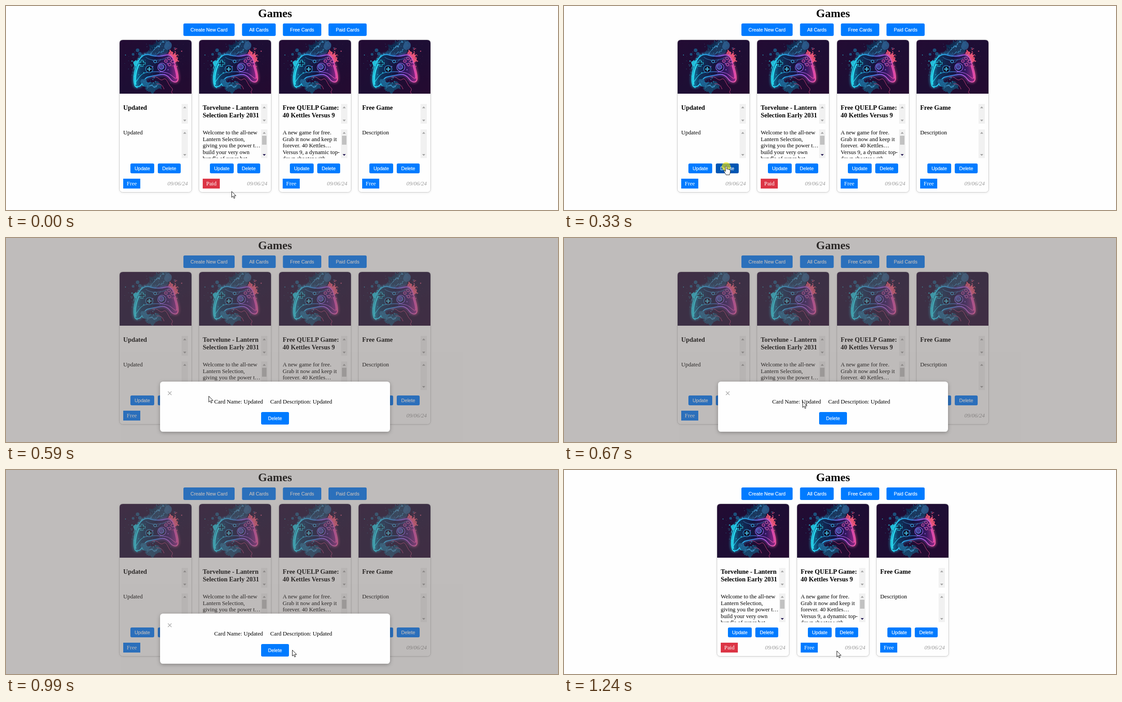
These frames come from a looping animation (1229 by 456 pixels, 1.83 s). An HTML page:

```html
<!DOCTYPE html>
<html lang="en">
<head>
<meta charset="utf-8">
<title>Games</title>
<style>
html, body { margin: 0; width: 100%; height: 100%; overflow: hidden; background: #fefefe; }
svg { display: block; }
text { font-family: "Liberation Serif", "Times New Roman", serif; font-size: 12.8px; white-space: pre; }
.h1 { font-size: 25.6px; font-weight: bold; text-anchor: middle; }
.name { font-size: 14.4px; font-weight: bold; }
.date { font-style: italic; fill: #999; text-anchor: end; }
.btn rect { fill: #007bff; }
.btn text { font-family: "Liberation Sans", Arial, sans-serif; font-size: 10.667px; fill: #fff; stroke: #fff; stroke-width: .2; text-anchor: middle; }
.tag text { fill: #fff; text-anchor: middle; }
.card > .box { fill: #fefefe; stroke: #ccc; filter: drop-shadow(0 1px 2px rgba(0,0,0,.08)); }
.modal > .box { fill: #fefefe; filter: drop-shadow(0 2px 4px rgba(0,0,0,.3)); }

.row, .gone, .dialog, .hot1 rect, .hot2 rect, .cursor, .arrow, .hand, .ring {
  animation: 1830ms step-end infinite;
}
.row { animation-name: row; }
.gone { animation-name: gone; }
.dialog { animation-name: dialog; }
.hot1 rect { animation-name: hot1; }
.hot2 rect { animation-name: hot2; }
.cursor { animation-name: move; }
.arrow { animation-name: arrow; }
.hand { animation-name: hand; }
.ring { animation-name: ring; }

@keyframes row { 0% { transform: none; } 67.75%, 100% { transform: translateX(-89px); } }
@keyframes gone { 0% { visibility: visible; } 67.75%, 100% { visibility: hidden; } }
@keyframes dialog { 0% { visibility: hidden; } 22.95% { visibility: visible; } 67.75%, 100% { visibility: hidden; } }
@keyframes hot1 { 0% { fill: #007bff; } 13.66% { fill: #0056b3; } 22.95%, 100% { fill: #007bff; } }
@keyframes hot2 { 0% { fill: #007bff; } 54.64% { fill: #0056b3; } 67.75%, 100% { fill: #007bff; } }
@keyframes arrow {
  0% { visibility: visible; } 13.66% { visibility: hidden; }
  22.95% { visibility: visible; } 54.64% { visibility: hidden; }
  67.75%, 100% { visibility: visible; }
}
@keyframes hand {
  0% { visibility: hidden; } 13.66% { visibility: visible; }
  22.95% { visibility: hidden; } 54.64% { visibility: visible; }
  67.75%, 100% { visibility: hidden; }
}
@keyframes ring {
  0% { visibility: hidden; } 18.03% { visibility: visible; }
  22.95% { visibility: hidden; } 63.38% { visibility: visible; }
  67.75%, 100% { visibility: hidden; }
}
@keyframes move {
  0% { transform: translate(502px, 414px); }
  4.37% { transform: translate(486px, 408px); }
  8.74% { transform: translate(427px, 384px); }
  13.66% { transform: translate(371px, 361px); }
  18.03% { transform: translate(361px, 358px); }
  22.95% { transform: translate(361px, 358px); }
  27.32% { transform: translate(388px, 355px); }
  32.24% { transform: translate(451px, 353px); }
  36.61% { transform: translate(531px, 365px); }
  40.98% { transform: translate(606px, 386px); }
  45.35% { transform: translate(642px, 399px); }
  49.72% { transform: translate(637px, 402px); }
  54.64% { transform: translate(618px, 403px); }
  59.01% { transform: translate(608px, 403px); }
  63.38% { transform: translate(607px, 403px); }
  67.75%, 100% { transform: translate(607px, 404px); }
}
</style>
</head>
<body>
<svg id="stage" width="1229" height="456" viewBox="0 0 1229 456">
  <defs>
    <clipPath id="photo"><path d="M0 120V7Q0 0 7 0H153Q160 0 160 7V120Z"/></clipPath>
    <clipPath id="scroll"><rect x="8" y="200" width="131" height="64"/></clipPath>
    <linearGradient id="night" x2="1" y2="1">
      <stop stop-color="#230b33"/><stop offset=".5" stop-color="#1d0e34"/><stop offset="1" stop-color="#250a30"/>
    </linearGradient>
    <linearGradient id="shell" x2="1">
      <stop stop-color="#128db5"/><stop offset=".16" stop-color="#0e3760"/><stop offset=".5" stop-color="#15133d"/>
      <stop offset=".8" stop-color="#361863"/><stop offset="1" stop-color="#a02c8c"/>
    </linearGradient>
    <linearGradient id="neon" x2="1">
      <stop stop-color="#25e0f6"/><stop offset=".45" stop-color="#2f8ae0"/>
      <stop offset=".7" stop-color="#9a58e8"/><stop offset="1" stop-color="#ff5ba6"/>
    </linearGradient>
    <filter id="rough" x="-.1" y="-.1" width="1.2" height="1.2">
      <feTurbulence type="fractalNoise" baseFrequency=".12" numOctaves="3" seed="4"/>
      <feDisplacementMap in="SourceGraphic" scale="14" xChannelSelector="R" yChannelSelector="G"/>
    </filter>
    <filter id="glow"><feGaussianBlur stdDeviation="2.5"/></filter>
    <path id="pad" d="M34 102C29 88 33 62 44 44C50 34 58 31 66 33C76 37 92 37 102 34C112 31 119 38 122 50C127 64 131 78 130 88C128 97 118 95 112 86C106 78 100 76 92 77C80 79 70 81 62 83C52 87 50 104 42 104C38 105 35 104 34 102Z"/>
    <g id="art">
      <rect width="160" height="120" fill="url(#night)"/>
      <g fill="#174268" filter="url(#rough)">
        <path d="M62 36C58 24 70 22 74 14C77 7 82 10 85 0H110C112 8 103 10 108 18C113 26 104 36 92 34Z" opacity=".8"/>
        <path d="M54 101C60 90 66 99 74 94C84 90 92 97 96 107C90 114 84 108 79 117C70 123 66 110 58 112Z"/>
        <path d="M66 13C72 4 77 13 83 6C87 17 78 24 70 24Z" fill="#102c50"/>
        <path d="M68 30C76 25 74 18 83 16S88 7 97 4M84 31C91 27 96 29 100 20M61 106C70 100 76 108 86 101" fill="none" stroke="#3986b8" stroke-width="2"/>
        <path d="M108 35L113 25L119 29L126 24L125 32L132 37L126 42L130 50L120 52Z" fill="#e7526f"/>
        <path d="M27 45L35 48L42 40L52 32L47 48L38 60L28 66L34 56Z" fill="#20b8d3"/>
        <path d="M31 82L38 90L36 108L44 98L56 103L50 88Z" fill="#23b7d4"/>
      </g>
      <path d="M103 4C112 0 119 8 115 17C111 25 99 23 99 14Z" fill="#2e6294" opacity=".8"/>
      <g fill="#1c4f7b"><circle cx="40" cy="23" r="4"/><circle cx="30" cy="32" r="3"/><circle cx="45" cy="31" r="4"/></g>
      <use href="#pad" fill="none" stroke="url(#neon)" stroke-width="6" opacity=".5" filter="url(#glow)"/>
      <use href="#pad" fill="url(#shell)" stroke="url(#neon)" stroke-width="2"/>
      <path d="M36 100C33 84 37 64 46 49" fill="none" stroke="#2fe3f5" stroke-width="2.6"/>
      <path d="M121 56C125 68 128 78 127 86" fill="none" stroke="#ee4fb4" stroke-width="2.4"/>
      <path d="M36 94C42 86 46 76 58 73C72 70 94 70 107 74C118 78 121 88 128 85" fill="none" stroke="url(#neon)" stroke-width="1.1"/>
      <path d="M58 38C68 48 94 47 108 38M72 44C76 52 88 53 91 43" fill="none" stroke="#367ebd"/>
      <path d="M72 84C83 76 89 94 97 88S107 99 115 106S110 116 118 119M82 98C91 97 96 101 99 110" fill="none" stroke="#c7437e"/>
      <path d="M45 90C50 83 56 93 63 86V97C69 90 66 106 58 104" fill="#1a6291" filter="url(#rough)"/>
      <path d="M48 45H52V50H57V54H52V59H48V54H43V50H48Z" fill="#0b1d3d" stroke="#2fd2ec" stroke-width="1.1"/>
      <g fill="#110f30" stroke-width="1.4">
        <circle cx="66" cy="65" r="8" stroke="#2a8bc4"/>
        <circle cx="94" cy="61" r="9" stroke="#8c62e6"/>
        <circle cx="93" cy="60" r="5.5" fill="#463c91" stroke="#587ee4"/>
        <circle cx="79" cy="48" r="3" stroke="#3b9ad3"/>
      </g>
      <path d="M66 60V70M61 65H71" stroke="#43bddc" stroke-width="2.2"/>
      <g fill="#4a1c6c" stroke="#f36cbb">
        <circle cx="110" cy="41" r="3.2"/><circle cx="118" cy="48" r="3.2"/>
        <circle cx="103" cy="47" r="3.2"/><circle cx="111" cy="55" r="3.2"/>
      </g>
      <g id="spray"></g>
    </g>
  </defs>
</svg>
<script>
const stage = document.getElementById('stage');

const label = (x, y, s, cls = '') => `<text class="${cls}" x="${x}" y="${Math.round(y)}">${s}</text>`;
const lines = (list, y, step, cls) => list.map((s, i) => label(8, y + i * step, s, cls)).join('');
const button = (x, y, w, h, s, cls = '') =>
  `<g class="btn ${cls}"><rect x="${x}" y="${y}" width="${w}" height="${h}" rx="3.2"/>` +
  label(x + w / 2, y + h / 2 + 4, s) + '</g>';

function scrollbar(y, h, thumb) {
  const x = 138, mid = x + 7, low = y + h - 9;
  return `<rect x="${x}" y="${y}" width="14" height="${h}" fill="#f1f1f1"/>` +
    `<path d="M${mid - 3.5} ${y + 9.5}l3.5 -4l3.5 4z" fill="#a3a3a3"/>` +
    `<path d="M${mid - 3.5} ${low}l3.5 4l3.5 -4z" fill="${thumb ? '#2b2058' : '#a3a3a3'}"/>` +
    (thumb ? `<rect x="${x + 2}" y="${y + 14}" width="10" height="20" fill="#c1c1c1"/>` : '');
}

function card({ x, name, text, paid, cls = '', hot = '' }) {
  return `<g class="${cls}"><g class="card" transform="translate(${x} 76)">
    <rect class="box" x="-.5" y="-.5" width="161" height="341" rx="7"/>
    <use href="#art" clip-path="url(#photo)"/>
    ${lines(name, 156, 16.6, 'name')}${scrollbar(143, 44)}
    <g clip-path="url(#scroll)">${lines(text, 211.3, 14.54)}</g>${scrollbar(200, 64, text.length > 1)}
    ${button(24, 276, 53, 22, 'Update')}${button(85, 276, 51, 22, 'Delete', hot)}
    <g class="tag"><rect x="8" y="310" width="38" height="22" fill="${paid ? '#dc3545' : '#007bff'}"/>
    ${label(27.2, 325, paid ? 'Paid' : 'Free')}</g>${label(152, 325, '09/06/24', 'date')}
  </g></g>`;
}

const cards = [
  { x: 253, name: ['Updated'], text: ['Updated'], cls: 'gone', hot: 'hot1' },
  { x: 430, name: ['Torvelune - Lantern', 'Selection Early 2031'], paid: true,
    text: ['Welcome to the all-new', 'Lantern Selection,', 'giving you the power t…', 'build your very own', 'bundle of super hot'] },
  { x: 608, name: ['Free QUELP Game:', '40 Kettles Versus 9'],
    text: ['A new game for free.', 'Grab it now and keep it', 'forever. 40 Kettles…', 'Versus 9, a dynamic top-', 'down shooter with'] },
  { x: 785, name: ['Free Game'], text: ['Description'] }
];

stage.insertAdjacentHTML('beforeend', `
  <rect width="1229" height="456" fill="#fefefe"/>
  ${label(599, 25, 'Games', 'h1')}
  ${button(395, 39, 114, 28, 'Create New Card')}${button(525.5, 39, 75, 28, 'All Cards')}
  ${button(616.5, 39, 85.5, 28, 'Free Cards')}${button(718, 39, 85, 28, 'Paid Cards')}
  <g class="row">${cards.map(card).join('')}</g>
  <g class="dialog">
    <rect width="1229" height="456" fill="rgba(104,95,93,.42)"/>
    <g class="modal">
      <rect class="box" x="343" y="321" width="512" height="112" rx="6.4"/>
      <path d="M360.5 343l8 8m0 -8l-8 8" stroke="#aaa" stroke-width="1.4"/>
      ${label(463.5, 370, 'Card Name: Updated')}${label(588.3, 370, 'Card Description: Updated')}
      ${button(568, 389, 62, 28, 'Delete', 'hot2')}
    </g>
  </g>
  <g class="cursor">
    <circle class="ring" cy="1" r="10" fill="rgba(255,238,0,.6)"/>
    <path class="arrow" d="M.5 .5V13.8L3.5 11L5.6 16L7.8 15L5.7 10.3H10Z" fill="#fff" stroke="#111"/>
    <path class="hand" d="M-1.6 12V1.6C-1.6 -.4 1.3 -.4 1.3 1.6V7C2 5.8 4 6 4.2 7.4C5.2 6.4 6.7 6.8 6.9 8.2C8.2 7.5 9.2 8.4 9.2 9.6V13.5C9.2 15.5 7.7 16.5 7.7 19.5H-.4C-.8 16.8 -3.2 15 -4.9 11.6C-5.4 10 -3.6 9.2 -2.8 10.4Z" fill="#fff" stroke="#111" stroke-width=".9"/>
  </g>`);

let seed = 11;
const rnd = () => (seed = seed * 16807 % 2147483647) / 2147483647;
const spread = () => rnd() + rnd() + rnd() - 1.5;
// centre x, y, spread x, y, colour, count
const clouds = [
  [36, 52, 22, 30, '#27cbe2', 50], [122, 38, 20, 24, '#ee5b86', 45],
  [86, 18, 36, 22, '#3b83b5', 50], [72, 98, 36, 18, '#2b86b2', 35], [95, 62, 30, 18, '#a66be6', 25]
];
document.getElementById('spray').innerHTML = clouds.map(([x, y, w, h, color, n]) =>
  Array.from({ length: n }, () => {
    const cx = x + spread() * w, cy = y + spread() * h, r = .3 + rnd() ** 3 * 1.4;
    return `<circle cx="${cx.toFixed(1)}" cy="${cy.toFixed(1)}" r="${r.toFixed(2)}" fill="${color}" opacity=".75"/>`;
  }).join('')).join('');
</script>
</body>
</html>
```
